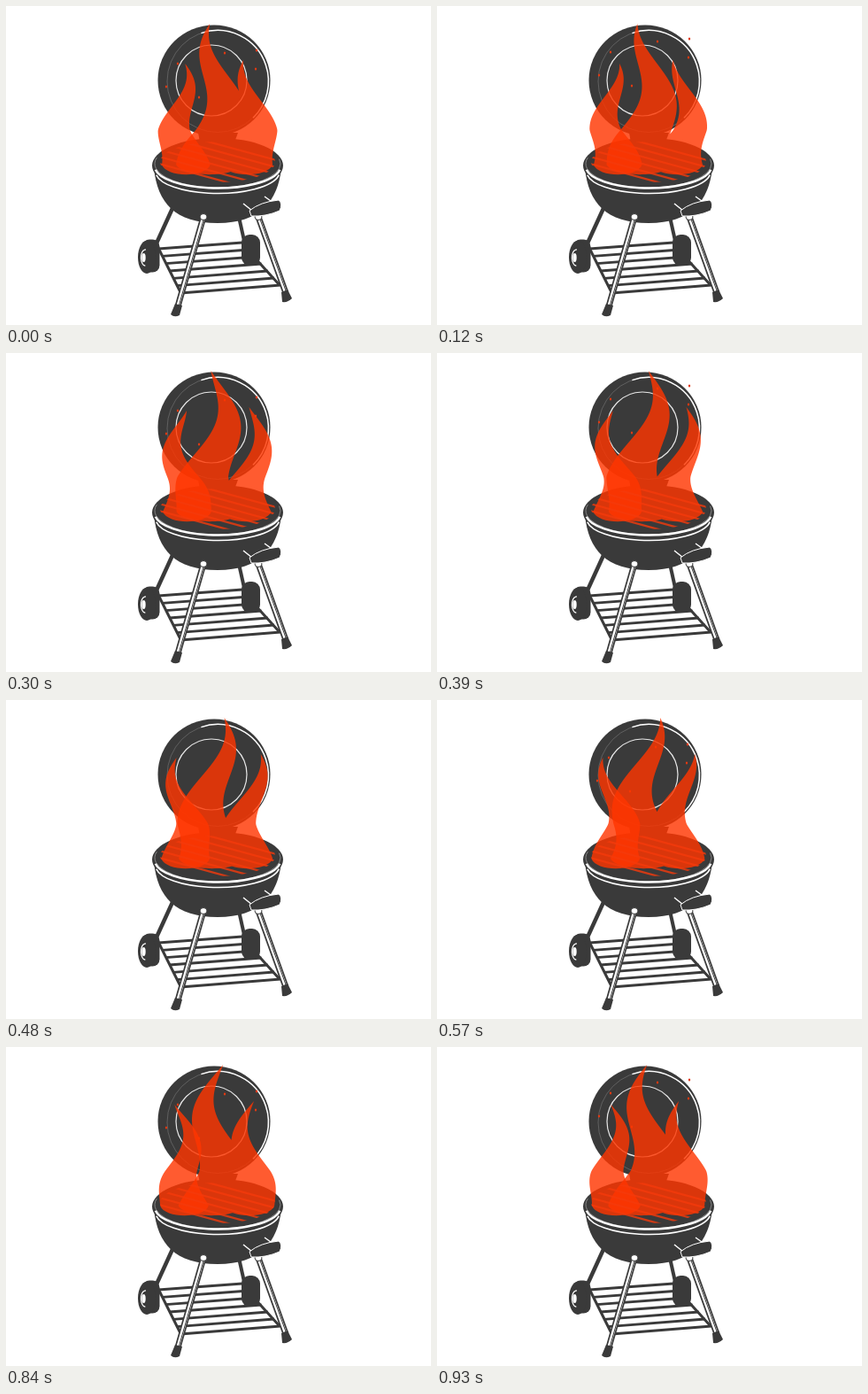
An HTML page with a canvas that plays this animation: 480 px wide and 360 px high, repeating every 0.99 s.

```html
<!DOCTYPE html>
<html lang="en">
<head>
<meta charset="utf-8">
<title>Kettle grill</title>
<style>
html, body { margin: 0; width: 100%; height: 100%; overflow: hidden; background: #fff; }
canvas { display: block; }
</style>
</head>
<body>
<canvas id="stage" width="480" height="360"></canvas>
<script>
const ctx = document.getElementById('stage').getContext('2d');
const DARK = '#3a3a3a', FIRE = '#ff3500', STEPS = 11, BASE = 179;

// Each tongue sways as a wave climbing from its base: `peak` is the step at
// which the tip is furthest right, `lag` the steps the wave takes per pixel.
const LEFT = { x: 196, top: 65, lean: .06, sway: 11, peak: 1.7, lag: .092 };
const MIDDLE = { x: 240, top: 20, lean: -.05, sway: 14, peak: 6.9, lag: .07 };
const RIGHT = { x: 279, top: 61, lean: -.05, sway: 12.5, peak: 6.4, lag: .08 };

const SPARKS = [[194, 65], [247, 53], [283, 50], [282, 71], [181, 91], [218, 103]];

const mix = (a, b, f) => a + (b - a) * f;

function paint(path, fill, stroke, width = 1) {
  if (fill) { ctx.fillStyle = fill; ctx.fill(path); }
  if (stroke) { ctx.strokeStyle = stroke; ctx.lineWidth = width; ctx.stroke(path); }
}

const shape = (d, ...style) => paint(new Path2D(d), ...style);

const line = (x1, y1, x2, y2, color, width) => shape(`M${x1} ${y1}L${x2} ${y2}`, null, color, width);

function oval(x, y, rx, ry, ...style) {
  arc(x, y, rx, ry, 0, 2 * Math.PI, ...style);
}

function arc(x, y, rx, ry, from, to, ...style) {
  const path = new Path2D();
  path.ellipse(x, y, rx, ry, 0, from, to);
  paint(path, ...style);
}

function block(x, y, w, h, r) {
  const path = new Path2D();
  path.roundRect(x, y, w, h, r);
  paint(path, DARK);
}

function drawLid() {
  oval(235, 84, 63.5, 62.5, DARK);
  oval(239, 85, 57, 57.5, null, '#707070', .7);
  arc(239, 85, 57.5, 57.5, -1.9, .8, null, '#fff', 1.5);
  oval(232, 84, 40, 40, null, '#e8e8e8', 1.2);
  shape('M217 143H262L258 154H219Z', DARK);
}

function drawStand() {
  line(190, 224, 168, 272, DARK, 4.5);
  line(263, 238, 269, 265, DARK, 4);
  for (let i = 0; i < 7; i++) {
    const f = i / 6;
    line(mix(172, 197, f), mix(274, 324, f), mix(267, 310, f), mix(267, 315, f), DARK, 2.8);
  }
  shape('M172 273L198 325M270 272L309 315', null, DARK, 3);
  block(266, 258, 21, 35, 9);
  block(154, 263.5, 19.5, 37, 8);
  oval(159, 283.5, 10, 18.5, DARK);
  arc(157, 284, 4.5, 9, 1.5, 4.9, null, '#fff', 1.3);
  oval(155.5, 284, 2.2, 5, '#fff');
}

function drawLeg(x1, y1, x2, y2, foot) {
  line(x1, y1, x2, y2, DARK, 7);
  line(x1, y1, x2, y2, '#fff', 3.6);
  line(x1 + 1, y1, x2 + 1, y2, DARK, 1);
  shape(foot, DARK);
  oval(x1, y1, 4, 3.5, '#fff', DARK);
}

function drawBowl() {
  shape('M167 183C171 222 191 245 239 245S307 220 311 183Z', DARK);
  oval(239, 180, 74, 31, DARK);
  arc(239, 178, 71, 27, -.2, 3.4, null, '#999', .8);
  arc(239, 181, 71, 24.5, .15, 2.99, null, '#fff', 2.4);
  arc(239, 187, 70, 24.5, .15, 2.99, null, '#fff', 1.6);
  drawLeg(223, 238, 194, 339, 'M191 336L199 338L196 349Q190 352 186 348Z');
  drawLeg(285, 238, 316, 324, 'M311 323L318 320L323 330Q318 335 312 334Z');
  shape('M268 223L278 231M292 215L299 220', null, '#fff', 1.5);
  shape('M275 231Q287 221 308 219Q313 223 309 231Q293 238 277 237Z', DARK, '#fff');
}

// Parallel glowing bars, cut off by the rim.
function drawBars() {
  ctx.save();
  ctx.beginPath();
  ctx.ellipse(239, 176, 65, 23, 0, 0, 2 * Math.PI);
  ctx.clip();
  ctx.globalAlpha = .8;
  for (let y = 156; y <= 196; y += 8) line(169, y - 19, 309, y + 19, '#f53a0c', 2.3);
  ctx.restore();
}

function addTongue(path, { x, top, lean, sway, peak, lag }, step) {
  const edge = (y, side) => {
    const depth = y - top;
    const angle = 2 * Math.PI * (step - peak + lag * depth) / STEPS;
    const reach = sway * Math.min(1, (187 - y) / 47);
    return x + lean * depth + reach * Math.cos(angle) + side * .24 * depth;
  };
  path.moveTo(edge(top, 0), top);
  for (let y = top; y <= BASE; y += 2) path.lineTo(edge(y, 1), y);
  path.bezierCurveTo(edge(BASE, .8), 194, edge(BASE, -.8), 194, edge(BASE, -1), BASE);
  for (let y = BASE; y > top; y -= 2) path.lineTo(edge(y, -1), y);
  path.closePath();
}

function drawFlame(step) {
  ctx.globalAlpha = .81;
  for (const group of [[MIDDLE, RIGHT], [LEFT]]) {
    const path = new Path2D();
    for (const tongue of group) addTongue(path, tongue, step);
    paint(path, FIRE);
  }
  ctx.globalAlpha = 1;
}

// Sparks appear, rise once, then go out for a step.
function drawSparks(phase) {
  if (phase === 2) return;
  for (const [x, y] of SPARKS) oval(x + 2 * phase, y - 13 * phase, 1.2, 1.5, '#e23a12');
}

function draw() {
  const t = performance.now() % 990;
  const step = t < 120 ? 0 : 1 + Math.floor((t - 120) / 90);
  ctx.fillStyle = '#fff';
  ctx.fillRect(0, 0, 480, 360);
  drawLid();
  drawStand();
  drawBowl();
  drawSparks(step % 3);
  drawFlame(step);
  drawBars();
  requestAnimationFrame(draw);
}
draw();
</script>
</body>
</html>
```
